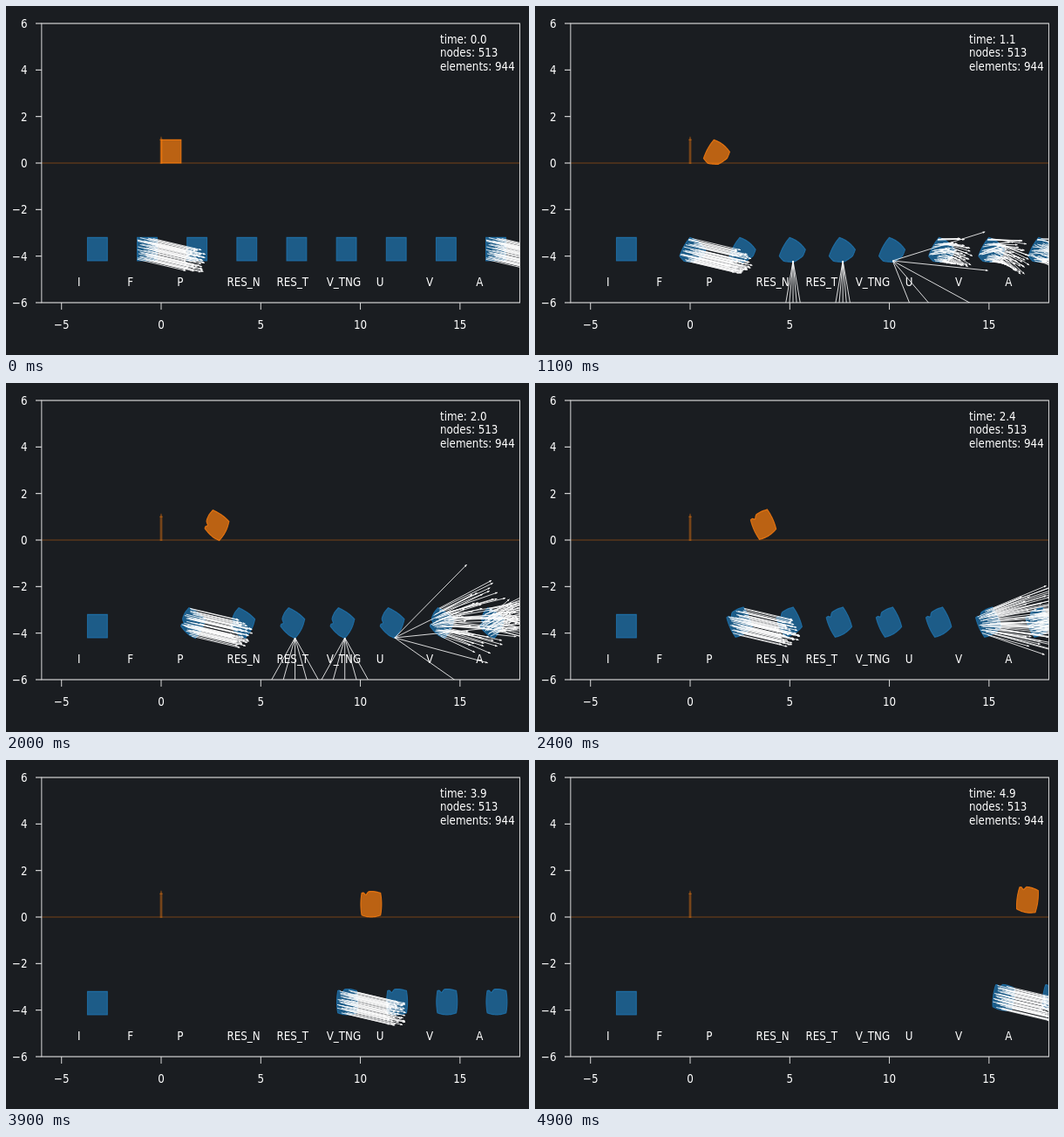
An HTML page with a canvas for the animation above (5 s loop, 600 by 400 pixels).

```html
<!DOCTYPE html>
<html lang="en">
<head>
<meta charset="utf-8">
<title>Rolling body</title>
<style>
html, body { margin: 0; width: 100%; height: 100%; overflow: hidden; background: #1a1d21; }
canvas { display: block; }
</style>
</head>
<body>
<canvas id="stage" width="600" height="400"></canvas>
<script>
const ctx = document.getElementById('stage').getContext('2d');
const U = 80 / 3, OX = 207.67, OY = 180;   // pixels per unit, plot zero (700 x 400 layout)
const px = x => OX + x * U, py = y => OY + y * U;   // y points down
const LABELS = ['I', 'F', 'P', 'RES_N', 'RES_T', 'V_TNG', 'U', 'V', 'A'];
const slot = k => -3.7 + 2.5 * k, DROP = 4.2;
const BLUE = '31,119,180', ORANGE = '255,127,14';
const FORCE = [2.43, .49];

// time, centre x, angle in degrees
const KEYS = [
  [0, .5, 0], [1.1, 1.33, 33], [2, 2.756, 121], [2.4, 3.675, 152],
  [3.2, 6.64, 175.5], [3.9, 10.54, 180], [4.9, 16.93, 189]
];
// take-off and landing
const HOPS = [[2.35, 3.75], [3.85, 4.15], [4.25, 5.6]];

const lerp = (a, b, k) => a + (b - a) * k;
const ramp = (t, a, b) => Math.min(1, Math.max(0, (t - a) / (b - a)));
const hash = n => { const s = Math.sin(n * 127.1 + 3.7) * 43758.5453; return s - Math.floor(s); };
const NODES = Array.from({ length: 54 }, (_, i) => [hash(i) - .5, (i + .5) / 54 - .5]);

// perimeter of the unit square, clockwise
const EDGE = [];
for (let side = 0; side < 4; side++)
  for (let i = 0, u = -.5, v = -.5; i < 16; i++, u += 1 / 16)
    EDGE.push([[u, v], [-v, u], [-u, -v], [v, -u]][side]);

function slope(i, c) {
  const a = KEYS[i - 1], b = KEYS[i + 1] || KEYS[i];
  return a ? (b[c] - a[c]) / (b[0] - a[0]) : 0;
}

function track(t, c) {
  let i = 0;
  while (i < KEYS.length - 2 && t > KEYS[i + 1][0]) i++;
  const a = KEYS[i], b = KEYS[i + 1], h = b[0] - a[0], s = (t - a[0]) / h, q = 1 - s;
  return a[c] * q * q * (1 + 2 * s) + b[c] * s * s * (3 - 2 * s)
    + h * s * q * (q * slope(i, c) - s * slope(i + 1, c));
}

const hop = t => HOPS.reduce((y, [a, b]) => y + .4 * Math.max(0, (t - a) * (b - t)), 0);
const crush = t => ramp(t, 0, 1.1) * (1 - ramp(t, 1.4, 2.3));

// bulging sides, one flattened corner that springs back and leaves a notch
function deform([u, v], t) {
  const wear = ramp(t, 0, 1.1), round = 1 - .05 * wear * (4 * u * v) ** 2;
  const x = u * round * (1 + .05 * wear * Math.cos(Math.PI * v));
  const y = v * round * (1 + .1 * wear * Math.cos(Math.PI * u));
  const push = .32 * crush(t) * Math.max(0, x + y - .35);
  const notch = .13 * ramp(t, 1.2, 2) * Math.exp(-(((u - .27) / .08) ** 2)) * Math.max(0, 2 * v);
  return [x - push, y - push - notch];
}

function pose(t) {
  t = Math.max(0, t);
  const r = track(t, 2) * Math.PI / 180, cos = Math.cos(r), sin = Math.sin(r);
  const turn = p => {
    const [u, v] = deform(p, t);
    return [u * cos - v * sin, u * sin + v * cos];
  };
  const x = track(t, 1);
  const y = .05 * crush(t) - hop(t) - Math.max(...EDGE.map(p => turn(p)[1]));
  return p => { const [a, b] = turn(p); return [x + a, y + b]; };
}

function line(x1, y1, x2, y2) {
  ctx.beginPath();
  ctx.moveTo(x1, y1);
  ctx.lineTo(x2, y2);
  ctx.stroke();
}

function arrow([x, y], [dx, dy]) {
  const len = Math.hypot(dx, dy);
  if (len < .02) return;
  const ex = px(x + dx), ey = py(y + dy), cx = dx / len, cy = dy / len;
  line(px(x), py(y), ex, ey);
  ctx.beginPath();
  ctx.moveTo(ex, ey);
  ctx.lineTo(ex - 3 * cx - 1.2 * cy, ey - 3 * cy + 1.2 * cx);
  ctx.lineTo(ex - 3 * cx + 1.2 * cy, ey - 3 * cy - 1.2 * cx);
  ctx.fill();
}

function body(place, ox, oy, rgb) {
  ctx.beginPath();
  EDGE.map(place).forEach(([x, y]) => ctx.lineTo(px(x + ox), py(y + oy)));
  ctx.closePath();
  ctx.fillStyle = `rgba(${rgb},.7)`;
  ctx.fill();
  ctx.strokeStyle = `rgba(${rgb},.8)`;
  ctx.lineWidth = 1.2;
  ctx.stroke();
}

function arrows(t) {
  const now = pose(t), start = pose(0), before = pose(t - .02);
  const diff = (a, b, s) => [(a[0] - b[0]) * s, (a[1] - b[1]) * s];
  const shake = t && !hop(t) ? 1.4 : 0;
  NODES.forEach((n, i) => {
    const p = now(n), at = k => [p[0] + slot(k), p[1] + DROP];
    arrow(at(1), FORCE);
    arrow(at(6), diff(p, start(n), 1));
    arrow(at(7), diff(p, before(n), 50));
    arrow(at(8), FORCE.map((f, j) => f + shake * (hash(i + t * 70 + j * 99) - .5)));
  });
  if (t && !hop(t)) contact(t, EDGE.map(now).reduce((a, b) => b[1] > a[1] ? b : a));
}

// reactions at the touching point: two downward fans, one sideways
function contact(t, low) {
  const k = ramp(t, 1.1, 2), at = i => [low[0] + slot(i), DROP];
  for (let s = -1; s <= 1; s += .5) {
    const down = [s * lerp(.4, 1.3, k), 2], a = (lerp(25, -5, k) + s * lerp(40, 36, k)) * Math.PI / 180;
    arrow(at(3), down);
    arrow(at(4), down);
    arrow(at(5), [4.8 * Math.cos(a), 4.8 * Math.sin(a)]);
  }
}

function axes() {
  ctx.strokeStyle = '#e4e4e4';
  ctx.fillStyle = '#fff';
  ctx.lineWidth = 1.1;
  ctx.strokeRect(px(-6), 20, 24 * U, 320);
  const name = v => String(v).replace('-', '\u2212');
  ctx.textAlign = 'right';
  for (let v = -6; v <= 6; v += 2) {
    line(px(-6) - 8, py(-v), px(-6), py(-v));
    ctx.fillText(name(v), px(-6) - 19, py(-v) + 5);
  }
  ctx.textAlign = 'center';
  for (let v = -5; v <= 15; v += 5) {
    line(px(v), 340, px(v), 348);
    ctx.fillText(name(v), px(v), 370.3);
  }
}

function draw(t) {
  ctx.setTransform(1, 0, 0, 1, 0, 0);
  ctx.fillStyle = '#1a1d21';
  ctx.fillRect(0, 0, 600, 400);
  ctx.scale(6 / 7, 1);
  ctx.font = '13.89px "DejaVu Sans", sans-serif';

  ctx.save();
  ctx.beginPath();
  ctx.rect(px(-6), 20, 24 * U, 320);
  ctx.clip();
  ctx.strokeStyle = ctx.fillStyle = `rgba(${ORANGE},.4)`;
  ctx.lineWidth = 1.2;
  line(px(-6), OY, px(18), OY);
  ctx.lineWidth = 3.2;
  line(OX, 181, OX, 153);
  ctx.beginPath();
  ctx.moveTo(OX, 149);
  ctx.lineTo(OX + 2.2, 154);
  ctx.lineTo(OX - 2.2, 154);
  ctx.fill();

  const now = pose(t);
  body(now, 0, 0, ORANGE);
  body(pose(0), slot(0) - 0.5 + .5, DROP, BLUE);
  for (let k = 1; k < 9; k++) body(now, slot(k), DROP, BLUE);
  ctx.strokeStyle = ctx.fillStyle = '#fff';
  ctx.lineWidth = .9;
  arrows(t);
  ctx.restore();

  axes();
  ctx.textAlign = 'left';
  LABELS.forEach((s, k) => ctx.fillText(s, px(slot(k) - .5), 321));
  [`time: ${t.toFixed(1)}`, 'nodes: 513', 'elements: 944']
    .forEach((s, i) => ctx.fillText(s, px(14), 42.5 + i * 15.7));
}

const began = performance.now();
function tick() {
  const ms = Math.max(0, performance.now() - began) % 5000;
  draw(Math.floor(ms / 100) / 10);
  requestAnimationFrame(tick);
}
tick();
</script>
</body>
</html>
```
